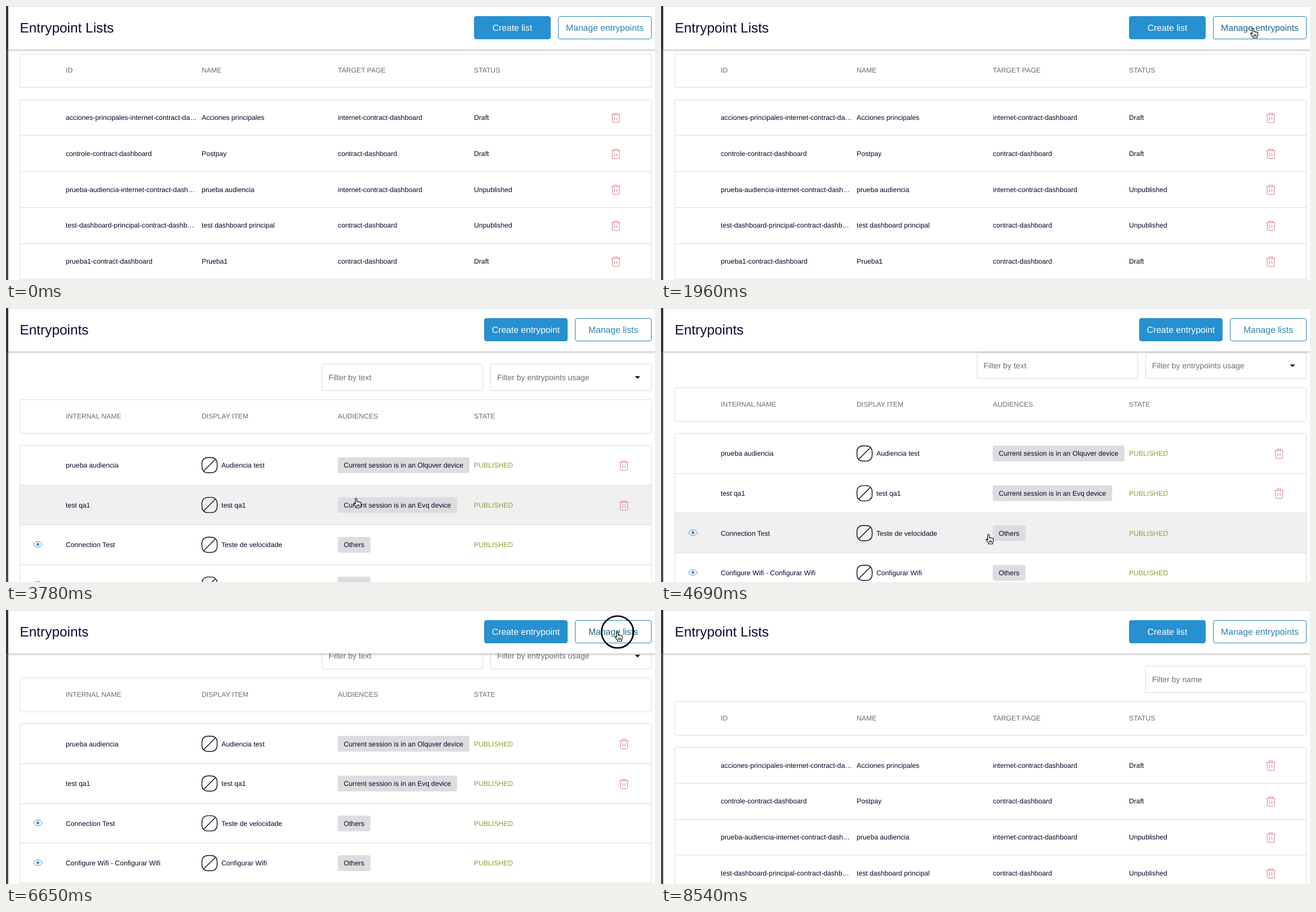
Animation, 1151 px wide and 486 px high, one loop 8.82 s. Source, as an HTML page:

```html
<!DOCTYPE html>
<html lang="en">
<head>
<meta charset="utf-8">
<title>Entrypoints</title>
<style>
html, body { margin: 0; height: 100%; overflow: hidden; background: #fff; }
svg { display: block; width: 100vw; height: 100vh; }
text { font: 12.2px "Liberation Sans", Arial, sans-serif; fill: #08062c; text-rendering: geometricPrecision; }
.title { font-size: 24.4px; fill: #0b0b35; }
.btn { font-size: 15.7px; text-anchor: middle; fill: #2a83ad; }
.btn.main { fill: #fff; }
.btn.hot { fill: #1c6387; }
.field { font-size: 13.95px; fill: #6e6e6e; }
.head { fill: #6c6c6c; }
.ok { fill: #86a32d; }
.line { fill: none; stroke: #dcdcdc; shape-rendering: crispEdges; }
.trash { fill: none; stroke: #dd7a84; }
.eye { fill: none; stroke: #3d8fbd; }
.none { fill: none; stroke: #0b0b20; stroke-width: 1.4; }
.bar { fill: #fff; filter: drop-shadow(0 1px 2px #0005); }
</style>
</head>
<body>
<svg id="stage" viewBox="0 0 1151 486">
  <defs>
    <path id="trash" class="trash" d="M-8-5.5H8M-3.5-5.5V-8H3.5V-5.5M-6.3-5.5V6.5q0 2 2 2H4.3q2 0 2-2V-5.5M-2-1.5V4.5M2-1.5V4.5"/>
    <g id="eye" class="eye">
      <path d="M-8.3 0Q0-10.5 8.3 0Q0 10.5-8.3 0Z"/>
      <circle r="2" fill="#2a83b5"/>
    </g>
    <path id="none" class="none" d="M-13.5-2C-13.5-10-10-13.5-2-13.5H2C10-13.5 13.5-10 13.5-2V2C13.5 10 10 13.5 2 13.5H-2C-10 13.5-13.5 10-13.5 2ZM-9.8 9.8L9.8-9.8"/>
  </defs>
</svg>
<script>
const LOOP = 8820, STEP = 70, COLS = [106, 347, 588.6, 830], TOP = 243.5;
const stage = document.getElementById('stage');
const ruler = document.createElement('canvas').getContext('2d');
ruler.font = '12.2px "Liberation Sans", Arial, sans-serif';

const text = (x, y, s, cls = '', size = 12.2) =>
  `<text x="${x}" y="${y + size * .355}" class="${cls}">${s}</text>`;
const use = (id, x, y) => `<use href="#${id}" x="${x}" y="${y}"/>`;
const box = (x, y, w, h) => `<rect class="line" x="${x}" y="${y}" width="${w}" height="${h}" rx="3"/>`;
const field = (x, s) => box(x, 99.5, 285, 47) + text(x + 11.5, 123, s, 'field', 13.95);
const chip = (y, s) =>
  `<rect x="588.3" y="${y - 14}" width="${ruler.measureText(s).width + 21.5}" height="28" rx="3" fill="#dddde0"/>` +
  text(599, y, s);

const button = (x, w, s, main) =>
  `<rect x="${x}" y="18.5" width="${w}" height="40" rx="3.5" fill="${main ? '#2690d0' : '#fff'}" ` +
  `stroke="${main ? '#2690d0' : '#2a83ad'}"/>` +
  text(x + w / 2, 38.5, s, main ? 'btn main' : 'btn manage', 15.7);

const listRow = (y, [id, name, page, status]) =>
  [id, name, page + 'contract-dashboard', status].map((s, i) => text(COLS[i], y, s)).join('') +
  use('trash', 1081.5, y + .5);

const entryRow = (y, [name, item, audience, watched]) =>
  text(COLS[0], y, name) + use('none', 361, y) + text(382, y, item) + chip(y, audience) +
  text(COLS[3], y, 'PUBLISHED', 'ok') +
  (watched ? use('eye', 56.5, y - .8) : use('trash', 1096, y + .5));

const pages = {
  lists: {
    title: 'Entrypoint Lists', pitch: 63.75, row: listRow, manageX: 979.5,
    buttons: button(830.5, 135, 'Create list', true) + button(979.5, 165, 'Manage entrypoints'),
    fields: field(859.5, 'Filter by name'),
    heads: ['ID', 'NAME', 'TARGET PAGE', 'STATUS'],
    rows: [
      ['acciones-principales-internet-contract-da…', 'Acciones principales', 'internet-', 'Draft'],
      ['controle-contract-dashboard', 'Postpay', '', 'Draft'],
      ['prueba-audiencia-internet-contract-dash…', 'prueba audiencia', 'internet-', 'Unpublished'],
      ['test-dashboard-principal-contract-dashb…', 'test dashboard principal', '', 'Unpublished'],
      ['prueba1-contract-dashboard', 'Prueba1', '', 'Draft']
    ]
  },
  entries: {
    title: 'Entrypoints', pitch: 70.6, row: entryRow, manageX: 1009.5,
    buttons: button(848.5, 147, 'Create entrypoint', true) + button(1009.5, 135, 'Manage lists'),
    fields: field(560.5, 'Filter by text') + field(859.5, 'Filter by entrypoints usage') +
      '<path d="M1115.3 121H1124.7L1120 125.6Z" fill="#08062c"/>',
    heads: ['INTERNAL NAME', 'DISPLAY ITEM', 'AUDIENCES', 'STATE'],
    rows: [
      ['prueba audiencia', 'Audiencia test', 'Current session is in an Olquver device'],
      ['test qa1', 'test qa1', 'Current session is in an Evq device'],
      ['Connection Test', 'Teste de velocidade', 'Others', true],
      ['Configure Wifi - Configurar Wifi', 'Configurar Wifi', 'Others', true]
    ]
  }
};

function pageMarkup(id, p) {
  const rules = p.rows.map((_, i) => {
    const y = TOP + (i + 1) * p.pitch;
    return `<path class="line" d="M24.5 ${y}H1144.5"/>`;
  }).join('');
  return `<g id="${id}">
    <g class="scroll">
      ${p.fields}${box(24.5, 162.5, 1120, 59.5)}
      ${p.heads.map((s, i) => text(COLS[i], 191.5, s, 'head')).join('')}
      <rect class="hover" x="25" width="1119" height="${p.pitch}" fill="#f0f0f0"/>
      ${box(24.5, TOP, 1120, 600)}${rules}
      <g class="cells">${p.rows.map((r, i) => p.row(TOP + (i + .5) * p.pitch, r)).join('')}</g>
    </g>
    <rect class="bar" x="0" y="0" width="1160" height="77"/>
    ${text(24.5, 38, p.title, 'title', 24.4)}${p.buttons}
  </g>`;
}

stage.innerHTML += Object.entries(pages).map(([id, p]) => pageMarkup(id, p)).join('') + `
  <path d="M0 .5H1151" stroke="#dcdcdc"/>
  <path d="M0 0H4V486H0Z" fill="#4b4853"/><path d="M0 0H4V77H0Z" fill="#363436"/>
  <circle id="ring" fill="none" stroke="#000" stroke-width="2.6"/>
  <path id="hand" fill="#fff" stroke="#000" stroke-width="1.1" stroke-linejoin="round"
    d="M-1.5 8V1.5a1.4 1.4 0 0 1 2.8 0V6.5a1.4 1.4 0 0 1 2.6.3a1.4 1.4 0 0 1 2.5.6a1.2 1.2 0 0 1 2.1 1V11.5q0 2-1.3 3.4V17H0V15.4L-4 10.4q-.9-1.9.7-2Q-2.3 8.5-1.5 10Z
    M1.6 11V14.5M3.5 11V14.5M5.4 11V14.5"/>`;

for (const [id, p] of Object.entries(pages)) {
  const g = document.getElementById(id);
  p.el = g;
  for (const cls of ['scroll', 'hover', 'cells', 'manage']) p[cls] = g.querySelector('.' + cls);
}
const ring = document.getElementById('ring'), hand = document.getElementById('hand');

// Fingertip path: time, x, y
const path = [
  [420, 780, 412], [980, 1056, 43], [1470, 1056, 43], [1750, 1050, 39.5],
  [2940, 1050, 39.5], [3780, 621, 337.5], [3920, 581, 401.5], [5460, 581, 401.5],
  [5880, 1070, 8], [6020, 1070, 8], [6300, 1084.5, 38.5], [7910, 1084.5, 38.5], [8540, 980, 505]
];
const clicks = [2030, 6580];

const clamp = v => Math.max(0, Math.min(1, v));
const ease = v => v * v * (3 - 2 * v);
const show = (el, on) => el.style.display = on ? '' : 'none';

function tipAt(t) {
  const i = Math.max(1, path.findIndex(k => k[0] >= t));
  if (t >= path.at(-1)[0]) return path.at(-1).slice(1);
  const [t0, x0, y0] = path[i - 1], [t1, x1, y1] = path[i];
  const f = ease(clamp((t - t0) / (t1 - t0)));
  return [x0 + (x1 - x0) * f, y0 + (y1 - y0) * f];
}

function draw(t) {
  const onEntries = t >= 2240 && t < 6790;
  const page = onEntries ? pages.entries : pages.lists;
  const loading = t >= 2240 && t < 2660 || t >= 6790 && t < 7000;
  const scroll = onEntries ? 41.6 * ease(clamp((t - 4480) / 420)) : t < 2240 ? 77.5 : 0;
  const [x, y] = tipAt(t);
  const visible = t >= 420 && y < 486;

  for (const p of Object.values(pages)) show(p.el, p === page);
  show(page.cells, !loading);
  page.scroll.setAttribute('transform', `translate(0 ${-scroll})`);

  const row = Math.floor((y + scroll - TOP) / page.pitch);
  show(page.hover, visible && y > 77 && row >= 0);
  page.hover.setAttribute('y', TOP + row * page.pitch);
  page.manage.classList.toggle('hot', visible && y > 18 && y < 59 && x > page.manageX && x < 1145);

  show(hand, visible);
  hand.setAttribute('transform', `translate(${x} ${y})`);

  const click = clicks.find(c => t >= c && t < c + 210);
  show(ring, click !== undefined);
  if (click !== undefined) {
    ring.setAttribute('cx', x);
    ring.setAttribute('cy', y + .5);
    ring.setAttribute('r', 14 + 14.3 * clamp((t - click) / 70));
    ring.setAttribute('opacity', t - click > 70 ? .5 : 1);
  }
}

const start = performance.now();
function tick() {
  const t = (performance.now() - start) % LOOP;
  draw(Math.floor(t / STEP) * STEP);
  requestAnimationFrame(tick);
}
tick();
</script>
</body>
</html>
```
